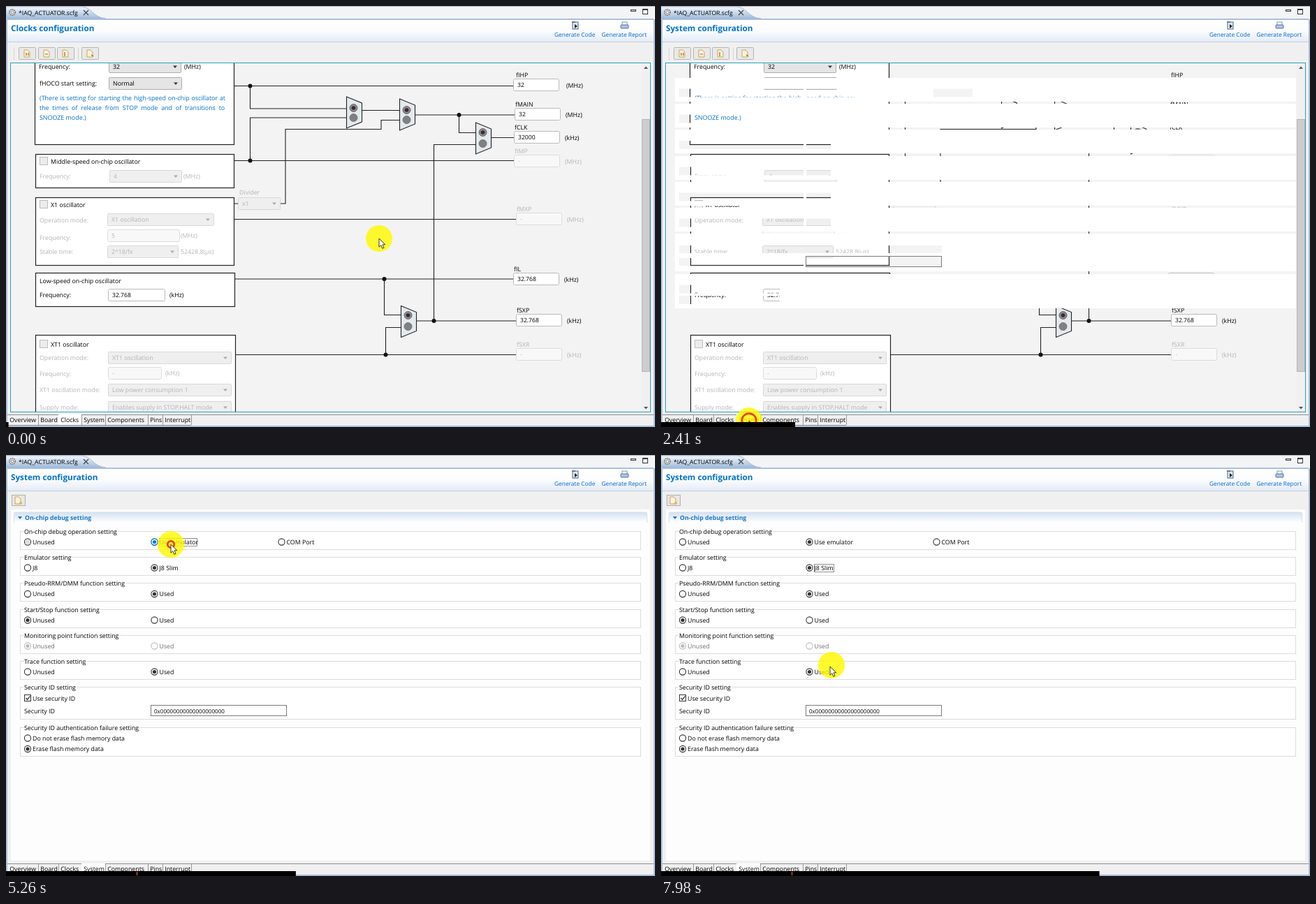
Recreate the animation shown at these times as an HTML page. Size 929 by 603 pixels, loop 8 s.

```html
<!DOCTYPE html>
<html lang="en">
<head>
<meta charset="utf-8">
<title>Configurator walkthrough</title>
<style>
  html, body { margin: 0; width: 100%; height: 100%; overflow: hidden; background: #f0f0f0; }
  svg { display: block; width: 929px; height: 603px; }
  text { font: 8.8px "Open Sans", "Noto Sans", sans-serif; fill: #000; text-rendering: geometricPrecision; white-space: pre; }
  .title { font-size: 11.7px; font-weight: 700; fill: #0072c6; }
  .section { font-size: 8.7px; font-weight: 700; fill: #1878c8; }
  .link { font-size: 8.35px; fill: #0066cc; }
  .hint { font-size: 8.9px; fill: #0070c9; }
  .value { font-size: 8.6px; }
  .id { font-size: 8.05px; }
  .off { fill: #b4b4b4; }
  .dim { fill: #6d6d6d; }
  .wire { fill: none; stroke: #222; stroke-width: 1.1; }
  .hot { fill: none; stroke: #00f; stroke-width: 4.4; }
</style>
</head>
<body>
<svg id="stage" viewBox="0 0 929 603"></svg>
<script>
const LOOP = 8000, LAG = 70;

// ---- drawing helpers (text is placed by its vertical centre) ----
const text = (x, y, s, cls = '', extra = '') =>
  `<text x="${x}" y="${y + 3.2}" class="${cls}" ${extra}>${s}</text>`;
const rect = (x, y, w, h, fill, stroke = 'none', extra = '') =>
  `<rect x="${x}" y="${y}" width="${w}" height="${h}" fill="${fill}" stroke="${stroke}" ${extra}/>`;
const path = (d, extra) => `<path d="${d}" ${extra}/>`;
const circle = (x, y, r, fill, stroke = 'none', extra = '') =>
  `<circle cx="${x}" cy="${y}" r="${r}" fill="${fill}" stroke="${stroke}" ${extra}/>`;
const layer = (id, body) => `<g id="${id}">${body}</g>`;
const wire = (d, cls = 'wire') => path(d, `class="${cls}"`);

const panel = (x, y, w, h) => rect(x + .5, y + .5, w, h, '#fff', '#222', 'stroke-width="1.2"');
const check = (x, y) => rect(x + .5, y + .5, 11, 11, '#ececec', '#bdbdbd');
const input = (x, y, w, s, cls = '') =>
  rect(x + .5, y + .5, w - 1, 17, cls ? '#f8f8f8' : '#fff', cls ? '#dcdcdc' : '#bbb', 'rx="2"') +
  text(x + 6, y + 9, s, 'value ' + cls);
const combo = (x, y, w, s, cls = '') =>
  rect(x + .5, y + .5, w - 1, 17, cls ? '#efefef' : '#e5e5e5', cls ? '#d8d8d8' : '#adadad', 'rx="1"') +
  text(x + 6, y + 9, s, cls) +
  path(`M${x + w - 12} ${y + 7.5}h6l-3 3.4z`, `fill="${cls ? '#aaa' : '#333'}"`);
const field = (label, y, cls = '', x = 48) => text(x, y, label, cls);

// ---- window frame ----
const EDGE = '#a9bdd6';
const tabs = [['Overview', 2, 46], ['Board', 46, 75], ['Clocks', 75, 108], ['System', 108, 142],
  ['Components', 142, 203], ['Pins', 203, 224], ['Interrupt', 224, 265]];

function frame() {
  const page = (x, y) => path(`M${x} ${y}h5l3 3v7h-8z`, 'fill="#fdf3dc" stroke="#c79a4b" stroke-width=".9"');
  return `<defs>
    <linearGradient id="tab" x2="0" y2="1"><stop stop-color="#f4f8fc"/><stop offset="1" stop-color="#9fbbdb"/></linearGradient>
    <linearGradient id="head" x2="0" y2="1"><stop stop-color="#fff"/><stop offset=".5" stop-color="#fbfcfe"/><stop offset="1" stop-color="#e4ecf6"/></linearGradient>
    <linearGradient id="bar" x2="0" y2="1"><stop stop-color="#d3e1f1"/><stop offset="1" stop-color="#fff"/></linearGradient>
    <clipPath id="view"><path d="M7 82H910V581H7z"/></clipPath></defs>` +
    rect(0, 0, 929, 603, '#f0f0f0') + rect(0, 0, 929, 18, '#f3f4f6') + rect(0, 0, 929, 1, '#a9b4c4') +
    path('M0 18V1H108C122 1 125 17 143 18z', 'fill="url(#tab)" stroke="#9bb0c9" stroke-width=".8"') +
    rect(2, 18, 925, 2, '#a9c1de') + rect(2, 20, 925, 31, 'url(#head)') + rect(2, 51, 925, 1, '#c3cfdd') +
    circle(9, 9, 4.2, '#e8e8e8', '#777', 'stroke-width="1.7" stroke-dasharray="1.8 .9"') + circle(9, 9, 2, '#fff', '#888') +
    text(18, 9.5, '*IAQ_ACTUATOR.scfg', '', 'style="font-size:8.66px"') +
    path('M111 6l7 7m0-7l-7 7', 'stroke="#444" stroke-width="1.2"') +
    rect(894.5, 5.5, 7, 2, '#fff', '#333') + rect(911.5, 4.5, 7, 7, '#fff', '#333') + rect(911, 4, 8, 2, '#333') +
    rect(811, 23, 8, 10, '#dce8f5', '#4d6685') + path('M814 26l4 3-4 3z', 'fill="#222"') + rect(810, 22, 5, 2, '#777') +
    rect(882, 23, 7, 5, '#fff', '#7c94b8') + rect(880, 27, 11, 5, '#a9c4e8', '#56749f', 'rx="1"') +
    text(785, 41, 'Generate Code', 'link') + text(852.5, 41, 'Generate Report', 'link') +
    layer('clockTools', path('M11.5 60v17M103.5 60v17', 'stroke="#bbb" stroke-dasharray="1 1"') +
      [18, 46, 73, 108].map(x => rect(x + .5, 59.5, 24, 17, '#e9e9e9', '#b5b5b5', 'rx="1"') + page(x + 8, 63)).join('') +
      path('M29 67v4m3-4v4M56 69h4M84 66v6M122 70l3 2', 'stroke="#a2641c" stroke-width="1.2"')) +
    layer('systemTools', rect(8.5, 57.5, 19, 15, '#e7e7e7', '#b0b0b0') + page(13, 60) +
      circle(21, 69, 2, '#f0b04c') + layer('toolFocus', rect(9, 58, 18, 14, 'none', '#1a73c8', 'stroke-width="2"')));
}

function bottomTabs() {
  return rect(2, 582, 925, 21, '#f0f0f0') + rect(2, 585, 925, 1, '#8f8f8f') + rect(0, 601, 929, 2, EDGE) +
    tabs.map(([s, a, b]) => layer('tab' + s, rect(a, 585, b - a, 15, '#fff')) +
      rect(b, 586, 1, 14, '#999') + text(a + 3.2, 593, s)).join('') + rect(2, 600, 263, 1, '#999');
}

// ---- clocks page ----
function mux(x, y, top = 16, bottom = 30) {
  return path(`M${x + .5} ${y}l22 9v27l-22 9z`, 'fill="#e3eaee" stroke="#222" stroke-width="1.1"') +
    circle(x + 10.5, y + top, 5.5, '#8a8a8a', '#666') + circle(x + 10.5, y + top, 2.8, '#3a2830') +
    circle(x + 10.5, y + bottom, 5.5, '#808080', '#777');
}

function clocksPage() {
  const outputs = [['fIHP', 726, 104, '32', 'MHz', 802], ['fMAIN', 728, 146, '32', 'MHz', 801],
    ['fCLK', 727, 179, '32000', 'kHz', 800], ['fIMP', 727, 213, '-', 'MHz', 800, 'off'],
    ['fMXP', 730, 296, '-', 'MHz', 803, 'off'], ['fIL', 726, 382, '32.768', 'kHz', 799],
    ['fSXP', 730, 441, '32.768', 'kHz', 803], ['fSXR', 730, 490, '-', 'kHz', 803, 'off']];
  const wires = ['M326 114.5H727M349.5 114V147H488M349.5 221V160H488M326 221.5H727', 'M510 149.5H563M586 156H730M648.5 156V181.5H672',
    'M327 283H332M393 283H400V176.5H537V163.5H563', 'M695 188.5H728M612.5 451V198.5H672M327 305.5H731',
    'M327 391H727M541.5 391V442.5H565M328 499.5H731M543.5 499V460.5H565M588 451H731'];
  const body =
    panel(41, 60, 285, 138) + field('Frequency:', 87, '', 47) + combo(147, 78, 104, '32') + text(255, 87, '(MHz)') +
    field('fHOCO start setting:', 111) + combo(147, 102, 105, 'Normal') +
    text(48, 132, '(There is setting for starting the high-speed on-chip oscillator at', 'hint', 'word-spacing=".5"') +
    text(48, 146, 'the times of release from STOP mode and of transitions to', 'hint', 'word-spacing="2.5"') +
    text(48, 160, 'SNOOZE mode.)', 'hint') +
    panel(42, 212, 284, 48) + check(48, 216) + text(64, 223, 'Middle-speed on-chip oscillator') +
    field('Frequency:', 243.5, 'off') + combo(148, 235, 104, '4', 'off') + text(254, 244, '(MHz)', 'off') +
    panel(42, 274, 284, 97) + check(48, 278) + text(64, 284.5, 'X1 oscillator') +
    field('Operation mode:', 306.5, 'off') + combo(145, 297, 153, 'X1 oscillation', 'off') +
    field('Frequency:', 331.5, 'off') + input(145, 320, 104, '5', 'off') + text(250, 329, '(MHz)', 'off') +
    field('Stable time:', 352, 'off') + combo(145, 343, 102, '2^18/fx', 'off') + text(250, 352, '52428.8(µs)', 'off') +
    panel(42, 382, 285, 48) + field('Low-speed on-chip oscillator', 394) +
    field('Frequency:', 414) + input(146, 405, 82, '32.768') + text(234, 414, '(kHz)') +
    panel(42, 471, 286, 140) + check(48, 478) + text(64, 484.5, 'XT1 oscillator') +
    field('Operation mode:', 504, 'off') + combo(146, 495, 177, 'XT1 oscillation', 'off') +
    field('Frequency:', 526.5, 'off') + input(146, 517, 77, '-', 'off') + text(228, 526, '(kHz)', 'off') +
    field('XT1 oscillation mode:', 550, 'off') + combo(146, 541, 177, 'Low power consumption 1', 'off') +
    field('Supply mode:', 575, 'off') + combo(146, 566, 177, 'Enables supply in STOP,HALT mode', 'off') +
    text(334, 267, 'Divider', 'off') + combo(332, 274, 61, 'x1', 'off') +
    wires.map(d => wire(d)).join('') +
    layer('highlight', wire('M327 391H727M541.5 391V442.5H565M588 451H731', 'hot')) +
    mux(487, 130) + mux(563, 133) + mux(672, 167, 14, 30) + mux(565, 429.5, 13.5, 29.5) +
    [[349.5, 114.5], [349.5, 221.5], [648.5, 156], [541.5, 391], [543.5, 499.5], [612.5, 451]]
      .map(([x, y]) => circle(x, y, 3, '#111')).join('') +
    outputs.map(([name, x, y, v, unit, ux, cls]) => text(x < 727 && y < 110 ? 730 : x + 1, y - 5.5, name, cls) +
      input(x, y, 66, v, cls) + text(ux, y + 9.5, `(${unit})`, cls)).join('');
  return rect(6.5, 81.5, 916, 500, '#f3f3f3', '#2e9fc4') + `<g clip-path="url(#view)">${body}</g>` +
    rect(910, 82, 12, 499, '#f0f0f0') + rect(910.5, 162.5, 11, 361, '#cdcdcd', '#b4b4b4') +
    path('M913 90l3-3.5 3 3.5zM913 574l3 3.5 3-3.5z', 'fill="#555"');
}

// ---- system page ----
// title, frame top, frame bottom, options [x, y, label, chosen]
const groups = [
  ['On-chip debug operation setting', 109, 136, [[31, 124.5, 'Unused'], [212.5, 124.5, 'Use emulator'], [394.5, 124.5, 'COM Port']]],
  ['Emulator setting', 146, 173, [[31, 161.5, 'J8'], [212.5, 161.5, 'J8 Slim', 1]]],
  ['Pseudo-RRM/DMM function setting', 183, 210, [[31, 199, 'Unused'], [212.5, 199, 'Used', 1]]],
  ['Start/Stop function setting', 221, 248, [[31, 236.5, 'Unused', 1], [212.5, 236.5, 'Used']]],
  ['Monitoring point function setting', 258, 285, [[31, 273.5, 'Unused', 1], [212.5, 273.5, 'Used']]],
  ['Trace function setting', 295, 322, [[31, 310.5, 'Unused'], [212.5, 310.5, 'Used', 1]]],
  ['Security ID setting', 332, 379, []],
  ['Security ID authentication failure setting', 390, 432,
    [[31, 405.5, 'Do not erase flash memory data'], [31, 421, 'Erase flash memory data', 1]]]];

const radio = (x, y, on, color) => circle(x, y, 4.6, '#fff', color, 'stroke-width="1.1"') +
  (on ? circle(x, y, 2.6, color) : '');

function options(emulator) {
  return groups.map(([, , , list], g) => list.map(([x, y, label, on], i) => {
    const live = g === 0 || (emulator && g !== 4);
    const chosen = g === 0 ? i === +emulator : on;
    return radio(x, y, chosen, live ? '#333' : '#bcbcbc') + text(x + 7, y, label, live ? '' : 'dim');
  }).join('')).join('');
}

const idBox = (fill, stroke) => rect(207.5, 358.5, 194, 15, fill, stroke);

function systemPage() {
  return rect(7, 78, 915, 503, '#fdfdfd') +
    path('M11.5 97V84q0-2 2-2H915.5q2 0 2 2V97', 'fill="url(#bar)" stroke="#d5e1ee"') +
    path('M17 88h6l-3 4z', 'fill="#1878c8"') + text(27, 90, 'On-chip debug setting', 'section') +
    groups.map(([title, top, bottom]) => rect(20.5, top + .5, 888, bottom - top - 1, '#fff', '#dcdcdc') +
      text(26, top + .7, title, '', 'stroke="#fdfdfd" stroke-width="3" paint-order="stroke"')).join('') +
    rect(26.5, 343.5, 9, 9, '#fff', '#333') + path('M28.5 348l2 2.4 4-5', 'fill="none" stroke="#333" stroke-width="1.3"') +
    text(38, 348.5, 'Use security ID') + text(26, 366.5, 'Security ID') +
    idBox('#fff', '#7a7a7a') + layer('idHover', idBox('none', '#333')) + text(212, 366.5, '0x00000000000000000000', 'id') +
    layer('optionsIdle', options(false)) + layer('optionsLive', options(true));
}

// Group backgrounds arrive first; control areas still show the previous page.
function wipe() {
  const box = (a, b, c, d) => `M${a} ${b}H${c}V${d}H${a}z`;
  const ends = { 26: 204, 208: 243, 390: 446 };
  let d = box(26, 343, 402, 354) + box(26, 361, 204, 372) + box(207, 358, 402, 374);
  groups.forEach(([, top, bottom, list], g) => {
    d += box(20, top - 6, 909, bottom + 1);
    list.forEach(([x, y]) => {
      const left = x < 100 ? 26 : x < 300 ? 208 : 390;
      const right = g === 7 ? 170 : g === 0 && left === 208 ? 277 : ends[left];
      d += box(left, y - 6, right, y + 6);
    });
  });
  return path(d, 'fill="#fff" fill-rule="evenodd"') + idBox('none', '#7a7a7a');
}

const focusBox = (x, y, w) => rect(x + .5, y + .5, w, 11, 'none', '#444', 'stroke-width=".9" stroke-dasharray="1.2 .6"');

document.getElementById('stage').innerHTML = frame() +
  layer('clocks', clocksPage()) + layer('wipe', wipe()) + layer('system', systemPage()) +
  layer('focusMode', focusBox(219, 119, 54)) + layer('focusModel', focusBox(219, 156, 28)) +
  layer('hoverMode', radio(212.5, 124.5, true, '#0078d7')) + layer('hoverModel', radio(212.5, 161.5, true, '#0078d7')) +
  layer('fadingDot', circle(31, 124.5, 4, '#ddd')) +
  layer('titleClocks', text(7, 33, 'Clocks configuration', 'title')) +
  layer('titleSystem', text(7, 33, 'System configuration', 'title')) +
  bottomTabs() + rect(0, 19, 2, 584, EDGE) + rect(927, 19, 2, 584, EDGE) +
  circle(0, 0, 19, '#fff900', 'none', 'id="halo" opacity=".82"') +
  circle(0, 0, 10, 'none', '#f03c14', 'id="ring" stroke-width="2.6"') +
  path('M0 0v12.2l2.8-2.6 2 4.6 2.2-1-2-4.4h3.8z', 'id="arrow" fill="#fff" stroke="#222" stroke-width=".9"') +
  rect(0, 596, 0, 7, '#000', 'none', 'id="progress"') +
  layer('ember', rect(186.5, 597, 2, 5, '#a0401c'));

// ---- motion ----
const track = [[0, 534, 333], [280, 534, 333], [520, 420, 343], [740, 333, 355], [900, 330, 358], [1020, 310, 399],
  [1140, 269, 412], [1300, 222, 442], [1500, 165, 535], [1720, 126, 594], [3150, 126, 594], [3320, 132, 594],
  [3580, 160, 540], [3800, 215, 400], [4000, 260, 200], [4120, 256, 178], [4250, 252, 155], [4600, 236, 128],
  [5640, 236, 128], [5800, 236, 144], [6250, 233, 162], [7150, 233, 162], [7460, 244, 250], [7700, 244, 288],
  [7910, 244, 301], [7980, 242, 303], [8000, 242, 303]];
const presses = [2215, 4940, 6630], RING = 430;
const el = id => document.getElementById(id);
const show = (id, on) => { el(id).style.display = on ? '' : 'none'; };
const place = (id, [x, y]) => el(id).setAttribute('transform', `translate(${x} ${y})`);
const within = (t, a, b) => t >= a && t < b;

function pointer(t) {
  const i = Math.max(1, track.findIndex(k => k[0] > t));
  const [t0, x0, y0] = track[i - 1], [t1, x1, y1] = track[i];
  const p = Math.max(0, (t - t0) / (t1 - t0));
  return [x0 + (x1 - x0) * p, y0 + (y1 - y0) * p];
}

function draw(t) {
  const tip = pointer(t), halo = pointer(t - LAG);
  const switched = t >= 2365, ready = t >= 2440, live = t >= 5040;
  show('clocks', !ready);
  show('wipe', switched && !ready);
  show('system', ready);
  show('clockTools', !ready);
  show('systemTools', ready);
  show('toolFocus', t < 4940);
  show('titleClocks', !switched);
  show('titleSystem', switched);
  tabs.forEach(([s]) => show('tab' + s, s === (switched ? 'System' : 'Clocks')));
  show('optionsIdle', !live);
  show('optionsLive', live);
  show('idHover', within(t, 3800, 5040));
  show('focusMode', within(t, 4940, 6630));
  show('focusModel', t >= 6630);
  show('hoverMode', within(t, 5040, 5850));
  show('hoverModel', within(t, 6050, 7220));
  show('fadingDot', within(t, 5040, 5320));
  show('highlight', tip[0] > 42 && tip[0] < 327 && tip[1] > 382 && tip[1] < 431);
  place('arrow', tip);
  place('halo', halo);
  place('ring', halo);
  const press = presses.find(p => within(t, p, p + RING));
  show('ring', press !== undefined);
  if (press !== undefined) el('ring').setAttribute('r', 19 * (1 - (t - press) / RING));
  el('progress').setAttribute('width', 3.5 + .0782 * t);
  show('ember', ready);
}

const start = performance.now();
function tick(now) {
  draw(Math.max(0, now - start) % LOOP);
  requestAnimationFrame(tick);
}
draw(0);
requestAnimationFrame(tick);
</script>
</body>
</html>
```
